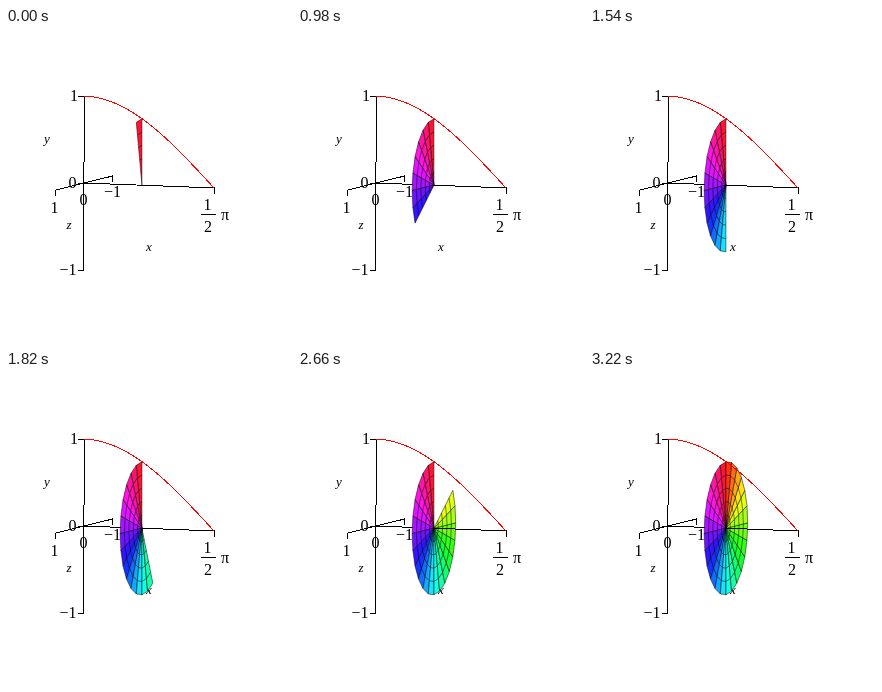
An HTML page that plays this animation: 286 by 315 pixels, repeating every 3360 ms.

```html
<!DOCTYPE html>
<html lang="en">
<head>
<meta charset="utf-8">
<style>
  html, body { margin: 0; width: 100%; height: 100%; overflow: hidden; background: #fff; }
  svg { display: block; }
  text { font: 16px "Liberation Serif", serif; text-anchor: middle; }
  .name { font-size: 13px; font-style: italic; }
  .axis { fill: none; stroke: #000; shape-rendering: crispEdges; }
  .mesh { stroke: #000; stroke-opacity: .62; stroke-width: .8; stroke-linejoin: round; }
  #curve { fill: none; stroke: #f00; shape-rendering: crispEdges; }
</style>
</head>
<body>
<svg width="286" height="315" viewBox="0 0 286 315">
  <path class="axis" d="M72 68.5H78.4L77.4 242.5H72M72 155.5H78M49.5 168V162.2L106.5 148V154M78 155L208.5 160V166M195 186.5H210"/>
  <text x="68" y="73">1</text>
  <text x="66.5" y="160">0</text>
  <text x="62" y="247">−1</text>
  <text x="48.5" y="185">1</text>
  <text x="77.5" y="177">0</text>
  <text x="106.5" y="169">−1</text>
  <text x="201.5" y="182">1</text>
  <text x="202" y="204">2</text>
  <text x="219" y="192">π</text>
  <text class="name" x="41" y="115">y</text>
  <text class="name" x="63" y="201">z</text>
  <text class="name" x="143" y="223">x</text>
  <g id="disc"></g>
  <path class="axis" d="M136 157.2L208.5 160"/>
  <path id="curve"/>
</svg>
<script>
const SECTORS = 24, RINGS = 5, STEP_MS = 140;
const DISC_X = 0.7;
const disc = document.getElementById('disc');

// Orthographic view of the 3D axes
const project = (x, y, z) => [
  78 + x * 130 / (Math.PI / 2) - 28.5 * z,
  155 + x * 5 / (Math.PI / 2) - 87 * y + 7 * z
].map(v => v.toFixed(2)).join(' ');

const discPoint = (sector, ring) => {
  const angle = sector / SECTORS * 2 * Math.PI;
  const radius = Math.cos(DISC_X) * ring / RINGS;
  return project(DISC_X, radius * Math.cos(angle), radius * Math.sin(angle));
};

const sectors = Array.from({ length: SECTORS }, (_, i) => {
  const path = document.createElementNS('http://www.w3.org/2000/svg', 'path');
  let d = `M${discPoint(i, 0)}L${discPoint(i, RINGS)}L${discPoint(i + 1, RINGS)}Z`;
  for (let ring = 1; ring < RINGS; ring++) d += `M${discPoint(i, ring)}L${discPoint(i + 1, ring)}`;
  path.setAttribute('d', d);
  path.setAttribute('class', 'mesh');
  path.setAttribute('fill', `hsl(${360 - (i + 0.5) * 360 / SECTORS}, 100%, 54%)`);
  return disc.appendChild(path);
});

const curvePoints = Array.from({ length: 61 }, (_, i) => {
  const x = i / 60 * Math.PI / 2;
  return project(x, Math.cos(x), 0);
});
document.getElementById('curve').setAttribute('d', 'M' + curvePoints.join('L'));

function draw() {
  const last = Math.floor(performance.now() / STEP_MS) % SECTORS;
  sectors.forEach((path, i) => path.setAttribute('visibility', i <= last ? 'visible' : 'hidden'));
  requestAnimationFrame(draw);
}
draw();
</script>
</body>
</html>
```
